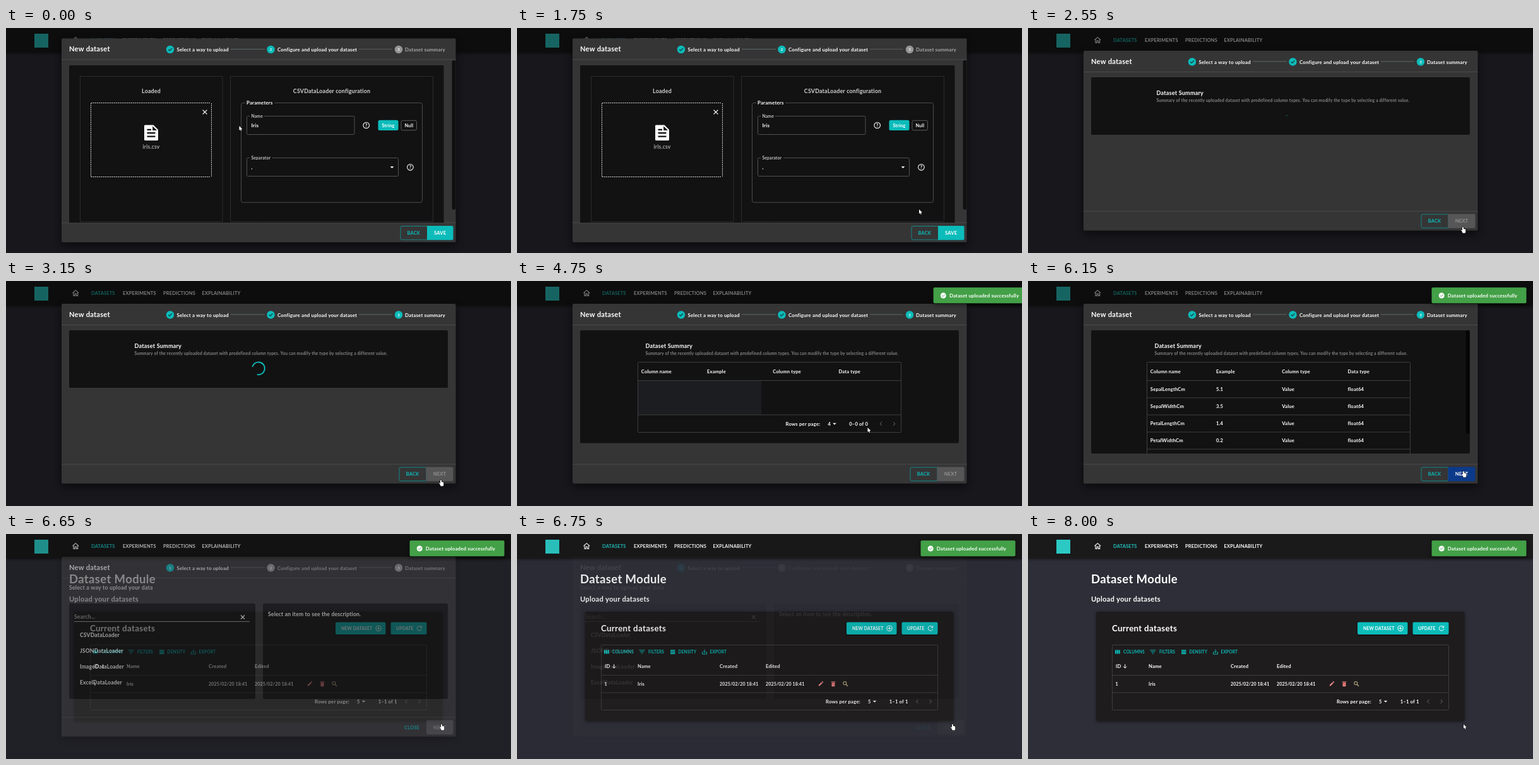
An HTML page with a canvas that plays this animation: 800 px wide and 356 px high, repeating every 8050 ms.

```html
<!DOCTYPE html>
<html lang="en">
<head>
<meta charset="utf-8">
<title>New dataset</title>
<style>
html, body { margin: 0; width: 100%; height: 100%; overflow: hidden; background: #17171c; }
canvas { display: block; width: 800px; height: 356px; }
</style>
</head>
<body>
<canvas id="stage"></canvas>
<script>
const W = 800, H = 356, LOOP = 8050;
const TEAL = '#0bbcba', WHITE = '#fff', GRAY = '#9b9b9c', LINE = '#3e3e40', PAPER = '#353536', INNER = '#121213';
const SAVED = 2550, UPLOADED = 4600, LOADED = 4950, HOVER = 5400, CLOSED = 6600;

const stage = document.getElementById('stage');
const layer = document.createElement('canvas');
const ratio = window.devicePixelRatio || 1;
for (const c of [stage, layer]) { c.width = W * ratio; c.height = H * ratio; }
const main = stage.getContext('2d'), modal = layer.getContext('2d');
main.scale(ratio, ratio);
modal.scale(ratio, ratio);
let g = main;

const clamp = v => Math.max(0, Math.min(1, v));
const smooth = v => { v = clamp(v); return v * v * (3 - 2 * v); };

function text(s, x, y, size, color = WHITE, align = 'left', weight = 700) {
  g.font = `${weight} ${size}px Lato, "Open Sans", sans-serif`;
  g.letterSpacing = size * 0.02 + 'px';
  g.textAlign = align;
  g.fillStyle = color;
  g.fillText(s, x, y + size * 0.36);
}
function box(x, y, w, h, fill, r = 0) {
  g.beginPath();
  g.roundRect(x, y, w, h, r);
  g.fillStyle = fill;
  g.fill();
}
function frame(x, y, w, h, color, r = 0) {
  g.beginPath();
  g.roundRect(x, y, w, h, r);
  stroke(color, 1);
}
function stroke(color, width) {
  g.strokeStyle = color;
  g.lineWidth = width;
  g.stroke();
}
function path(color, width, ...p) {
  g.beginPath();
  for (let i = 0; i < p.length; i += 2) g.lineTo(p[i], p[i + 1]);
  stroke(color, width);
}
function poly(color, ...p) {
  g.beginPath();
  for (let i = 0; i < p.length; i += 2) g.lineTo(p[i], p[i + 1]);
  g.fillStyle = color;
  g.fill();
}
function disc(x, y, r, color) {
  g.beginPath();
  g.arc(x, y, r, 0, 7);
  g.fillStyle = color;
  g.fill();
}
function ring(x, y, r, color, width = 1, from = 0, to = Math.PI * 2) {
  g.beginPath();
  g.arc(x, y, r, from, to);
  stroke(color, width);
}
function shadow(blur, dy, draw) {
  g.save();
  g.shadowColor = 'rgba(0,0,0,.5)';
  g.shadowBlur = blur * ratio;
  g.shadowOffsetY = dy * ratio;
  draw();
  g.restore();
}

const hline = (x1, x2, y, color = LINE) => path(color, 1, x1, y, x2, y);
const triangle = (x, y) => poly(WHITE, x - 2.8, y - 1.3, x + 2.8, y - 1.3, x, y + 1.6);
const tick = (x, y, k, color) => path(color, 1.1 * k, x - 2.6 * k, y, x - 0.8 * k, y + 1.9 * k, x + 2.8 * k, y - 1.9 * k);
function cross(x, y, r, color = WHITE) {
  path(color, 1.3, x - r, y - r, x + r, y + r);
  path(color, 1.3, x + r, y - r, x - r, y + r);
}
function help(x, y) {
  ring(x, y, 4.8, WHITE, 1.1);
  text('?', x, y, 8, WHITE, 'center');
}
function pager(x, y, rows, range, gaps) {
  text('Rows per page:', x, y, 7.8);
  text(rows, x + 67, y, 7.6);
  triangle(x + 77.5, y);
  text(range, x + 100.7, y, 7.7);
  for (const [cx, d] of [[x + gaps[0], -1], [x + gaps[1], 1]])
    path('#6c6c6e', 1, cx - d * 1.5, y - 3, cx + d * 1.5, y, cx - d * 1.5, y + 3);
}

function navBar() {
  shadow(4, 1, () => box(0, 0, W, 39, '#1a1a1b'));
  box(45, 9, 22, 22, '#2cc9c4');
  path(WHITE, 1.1, 105.5, 19, 110.3, 14.7, 115.1, 19);
  path(WHITE, 1.1, 107, 18.2, 107, 23.4, 109.2, 23.4, 109.2, 20, 111.4, 20, 111.4, 23.4, 113.6, 23.4, 113.6, 18.2);
  text('DATASETS', 135, 19.5, 7.5, '#21c2bd');
  text('EXPERIMENTS', 185, 19.5, 7.5);
  text('PREDICTIONS', 249, 19.5, 7.5);
  text('EXPLAINABILITY', 310.5, 19.5, 7.5);
}

function toolIcons() {
  for (let i = 0; i < 3; i++) box(138 + i * 2.8, 183.5, 2.2, 6, TEAL);
  hline(193.5, 202.5, 183.8, TEAL);
  hline(195, 201, 186.5, TEAL);
  hline(197, 199, 189.2, TEAL);
  for (let i = 0; i < 3; i++) box(243, 183.3 + i * 2.5, 7.5, 1.8, TEAL);
  path(TEAL, 1, 293.5, 186.5, 293.5, 190, 300.5, 190, 300.5, 186.5);
  path(TEAL, 1, 297, 182.5, 297, 187.5);
  path(TEAL, 1, 295, 185.7, 297, 187.7, 299, 185.7);
}

function page() {
  box(0, 0, W, H, '#2e2e38');
  navBar();
  text('Dataset Module', 100, 71, 18.5);
  text('Upload your datasets', 100, 102.5, 11.2);
  shadow(5, 1, () => box(108, 123, 583.5, 173, '#1e1c1d', 2));
  text('Current datasets', 133, 149.5, 13.4);

  shadow(3, 1, () => {
    box(522, 139.5, 79.5, 19.5, TEAL, 2);
    box(609.5, 139.5, 57, 19.5, TEAL, 2);
  });
  text('NEW DATASET', 531, 149.3, 6.9);
  ring(590, 149.3, 4.1, WHITE);
  path(WHITE, 1, 587.7, 149.3, 592.3, 149.3);
  path(WHITE, 1, 590, 147, 590, 151.6);
  text('UPDATE', 618, 149.3, 6.9);
  ring(655, 149.3, 3.6, WHITE, 1, 0.3, 5.5);
  path(WHITE, 1, 658.6, 145.3, 658.6, 148, 655.8, 148);

  frame(133.5, 175.5, 533, 103, LINE, 1);
  toolIcons();
  text('COLUMNS', 151, 186.5, 6.6, TEAL);
  text('FILTERS', 208, 186.5, 6.6, TEAL);
  text('DENSITY', 255.5, 186.5, 6.6, TEAL);
  text('EXPORT', 305.5, 186.5, 6.6, TEAL);

  text('ID', 139, 209.3, 7.7);
  path(WHITE, 1, 153.7, 206, 153.7, 212);
  path(WHITE, 1, 151, 209.5, 153.7, 212.2, 156.4, 209.5);
  text('Name', 191, 209.3, 7.7);
  text('Created', 321, 209.3, 7.7);
  text('Edited', 394, 209.3, 7.7);
  hline(134, 666, 223.5);
  text('1', 138.5, 237.3, 7.2);
  text('Iris', 191, 237.3, 7.7);
  text('2025/02/20 18:41', 321, 237.3, 7.05);
  text('2025/02/20 18:41', 394, 237.3, 7.05);
  path('#f08a8a', 2.2, 478.2, 240, 483, 235.2);
  path('#f08a8a', 2.2, 483.5, 234.7, 484.6, 233.6);
  box(498.5, 235.2, 5, 6, '#ef8080', 0.8);
  box(497.7, 233.4, 6.6, 1.2, '#ef8080');
  path('#8a4044', 0.8, 499.7, 236.5, 502.3, 239.3);
  ring(519.3, 236, 2.5, '#b9a983', 1.1);
  path('#b9a983', 1.3, 521.2, 238, 524, 240.8);
  hline(134, 666, 251);
  pager(489, 265, '5', '1–1 of 1', [145, 166]);
}

function stepper(y, active) {
  const steps = [[260, 'Select a way to upload', 270.5], [419.5, 'Configure and upload your dataset', 430], [622, 'Dataset summary', 632]];
  hline(356, 410, y - 0.5, '#5b6765');
  hline(559, 611.5, y - 0.5, active > 1 ? '#5b6765' : '#5d5d5e');
  steps.forEach(([x, label, tx], i) => {
    disc(x, y, 6.2, i <= active ? TEAL : '#969697');
    if (i < active) tick(x, y, 1.05, '#16393a');
    else text(String(i + 1), x, y, 6.2, WHITE, 'center');
    text(label, tx, y + 0.3, 7.9, i <= active ? WHITE : '#a9a9aa');
  });
}

function shell(top, bottom, footer, active) {
  shadow(14, 5, () => box(88, top, 624.5, bottom - top, PAPER, 2));
  text('New dataset', 100, top + 17, 11.1);
  stepper(top + 17.5, active);
  hline(88, 712.5, top + 33.5, '#4b4b4c');
  hline(88, 712.5, footer, '#4b4b4c');
}

function actions(x, y, mid, label, fill, color) {
  frame(x + 0.5, y + 0.5, mid - x, 21.5, '#138784', 2);
  text('BACK', (x + mid) / 2, y + 11.3, 7.4, TEAL, 'center');
  box(mid, y, 708.5 - mid, 22.5, fill, [0, 2, 2, 0]);
  text(label, (mid + 708.5) / 2, y + 11.3, 7.7, color, 'center');
}

function dropZone() {
  const c = '#cfcfcf', l = 134, t = 118, r = 326, b = 236;
  for (let x = l + 1; x < r - 2; x += 3) { box(x, t, 2, 1, c); box(x, b - 1, 2, 1, c); }
  for (let y = t + 1; y < b - 2; y += 3) { box(l, y, 1, 2, c); box(r - 1, y, 1, 2, c); }
  cross(315, 133, 3.4);
  poly(WHITE, 220, 153.5, 233.5, 153.5, 241, 161, 241, 177, 240, 178, 220, 178, 219, 177, 219, 154.5);
  poly(INNER, 232.2, 155.3, 232.2, 162, 239, 162);
  box(223.5, 165, 13, 2.2, INNER);
  box(223.5, 170.5, 13, 2.2, INNER);
  box(223.5, 159.7, 6.5, 2.2, INNER);
  text('iris.csv', 230, 188.3, 8.6, '#a3a3a4', 'center');
}

function field(x, y, w, label, value, gap) {
  frame(x + 0.5, y + 0.5, w, 29, '#515153', 2);
  box(x + 5, y - 1, gap, 3, INNER);
  text(label, x + 7.5, y + 0.3, 6.8, '#c4c4c5');
  text(value, x + 7.5, y + 15.3, 8.2);
}

function configure() {
  shell(16.5, 339, 308, 1);
  g.save();
  g.beginPath();
  g.rect(88, 51, 624.5, 257);
  g.clip();
  box(100, 59, 593.5, 260, INNER, 2);
  box(706.5, 51, 6, 236.5, '#101011', 3);
  frame(117.5, 76.5, 225.5, 230, '#2b2b2d');
  frame(355.5, 76.5, 321, 230, '#2b2b2d');
  text('Loaded', 230, 99.5, 8.9, '#d2d2d3', 'center');
  dropZone();
  text('CSVDataLoader configuration', 516, 99.5, 8.9, '#d2d2d3', 'center');
  frame(372.5, 118.5, 287, 157.5, '#4c4c4e', 3);
  box(379, 117, 46, 3, INNER);
  text('Parameters', 381, 118.3, 7.9);
  field(381, 139, 170.5, 'Name', 'Iris', 23);
  help(570.7, 154);
  box(589.5, 145.8, 32, 16.2, TEAL, 2.5);
  text('String', 605.5, 154, 7.3, WHITE, 'center');
  frame(626, 146.3, 24.5, 15.5, '#5b5b5d', 2.5);
  text('Null', 638.3, 154, 7.1, WHITE, 'center');
  field(381, 205, 240, 'Separator', ',', 36);
  triangle(611.5, 220.3);
  help(640.4, 220.3);
  g.restore();
  actions(624.5, 313, 667, 'SAVE', TEAL, WHITE);
}

function spinner(t) {
  const p = (t - SAVED) / 1400 % 1, total = 126.9;
  const e = smooth(p < 0.5 ? p * 2 : p * 2 - 1);
  const off = p < 0.5 ? 15 * e : 15 + 110 * e;
  const len = Math.min(p < 0.5 ? 1 + 99 * e : 100, total - off);
  const start = (p + off / total) * Math.PI * 2;
  ring(400, 138.3, 9.9, TEAL, 1.9, start, start + len / total * Math.PI * 2);
}

function summaryTable(full) {
  const l = full ? 188.5 : 191.5, bottom = full ? 296 : 239.5;
  const cols = [l + 5.3, l + 109.5, l + 213.7, l + 317.9];
  frame(l, 128.5, 417, bottom - 128.5, LINE, 1);
  ['Column name', 'Example', 'Column type', 'Data type'].forEach((s, i) => text(s, cols[i], 143.3, 7.6));
  hline(l, l + 417, 157.5);
  if (!full) {
    box(192, 158, 195, 53.5, '#1c1d21');
    hline(l, l + 417, 211.8);
    pager(425.5, 226, '4', '0–0 of 0', [151, 172]);
    return;
  }
  ['SepalLength', 'SepalWidth', 'PetalLength', 'PetalWidth'].forEach((name, i) => {
    const y = 171.3 + i * 27.1;
    [name + 'Cm', ['5.1', '3.5', '1.4', '0.2'][i], 'Value', 'float64'].forEach((s, j) => text(s, cols[j], y, 7.7));
    hline(l, l + 417, 184.8 + i * 27.1);
  });
}

function summary(t) {
  const full = t >= LOADED, shown = t >= UPLOADED;
  const x = full ? 200.4 : 203.5, bottom = full ? 273 : shown ? 256.5 : 169;
  shell(36, 320.5, 290, 2);
  box(100, 78, 600, bottom - 78, INNER, 2);
  g.save();
  g.beginPath();
  g.rect(100, 78, 600, bottom - 78);
  g.clip();
  text('Dataset Summary', x, 102.3, 9.1);
  text('Summary of the recently uploaded dataset with predefined column types. You can modify the type by selecting a different value.',
    x, 114.3, 6.75, '#858586');
  if (shown) summaryTable(full); else spinner(t);
  if (full) box(693.5, 78, 6, 164, '#060606', 3);
  g.restore();
  const fill = !full ? '#565657' : t < HOVER ? TEAL : '#0c3a8a';
  actions(622.5, 294.3, 665.5, 'NEXT', fill, full ? WHITE : '#919192');
}

function chooser() {
  shell(36, 320.5, 290, 0);
  text('Select a way to upload your data', 100, 84.5, 8.8, '#d0d0d0');
  box(100, 110, 295, 151, INNER, 2);
  box(407, 110, 293, 151, INNER, 2);
  text('Search...', 108, 130.5, 8.6, GRAY);
  cross(375, 131.5, 3);
  hline(108, 386, 138.5, GRAY);
  ['CSV', 'JSON', 'Image', 'Excel'].forEach((s, i) => text(s + 'DataLoader', 117, 160.3 + i * 25, 8.6));
  text('Select an item to see the description.', 415, 127.3, 8.6);
  text('CLOSE', 643, 306, 7.5, TEAL, 'center');
  box(666, 294.5, 42.5, 22.5, '#565657', 2);
  text('NEXT', 687, 306, 7.7, GRAY, 'center');
}

function dialog(t) {
  const alpha = t < CLOSED ? 1 : (1 - clamp((t - CLOSED) / 220)) ** 2;
  if (!alpha) return;
  g = modal;
  g.clearRect(0, 0, W, H);
  box(0, 0, W, H, 'rgba(0,0,0,.5)');
  if (t < SAVED) configure();
  else if (t < CLOSED) summary(t);
  else chooser();
  g = main;
  g.globalAlpha = alpha;
  g.drawImage(layer, 0, 0, W, H);
  g.globalAlpha = 1;
}

function toast(t) {
  const p = clamp((t - 4660) / 225);
  if (!p) return;
  const x = 639.5 + 160 * (1 - p) ** 4;
  shadow(6, 2, () => box(x, 10.3, 150, 25, '#43a047', 2));
  disc(x + 15.7, 23, 4.5, WHITE);
  tick(x + 15.7, 23, 0.85, '#43a047');
  text('Dataset uploaded successfully', x + 25.3, 23.2, 7.9);
}

const route = [
  [650, 369.5, 155], [1450, 637, 287], [1800, 637, 287], [2250, 689, 315], [3200, 689, 315],
  [3950, 555.5, 232], [4950, 555.5, 232], [5500, 690, 301], [LOOP, 690, 301]
];
function pointer(t) {
  let [, x, y] = route[0];
  for (let i = 1; i < route.length; i++) {
    const [t0, x0, y0] = route[i - 1], [t1, x1, y1] = route[i];
    if (t < t0) break;
    const k = smooth((t - t0) / (t1 - t0));
    x = x0 + (x1 - x0) * k;
    y = y0 + (y1 - y0) * k;
  }
  g.save();
  g.translate(x, y);
  if ((t > 2150 && t < 3220) || (t > HOVER && t < 6850)) {
    g.beginPath();
    g.roundRect(-1, 0, 2, 6, 1);
    g.roundRect(-1, 3, 5.2, 6.5, 1.5);
    stroke('#111', 1.2);
    g.fillStyle = WHITE;
    g.fill();
    poly(WHITE, -3.2, 4.8, -2, 4.4, 0, 6, 0.5, 9.3);
  } else {
    g.beginPath();
    for (const [px, py] of [[0, 0], [0, 7], [1.6, 5.6], [2.7, 8], [3.8, 7.5], [2.8, 5.2], [4.9, 5]]) g.lineTo(px, py);
    g.closePath();
    stroke('#111', 1.1);
    g.fillStyle = WHITE;
    g.fill();
  }
  g.restore();
}

const began = performance.now();
function tickFrame() {
  const t = (performance.now() - began) % LOOP;
  g = main;
  page();
  dialog(t);
  toast(t);
  pointer(t);
  requestAnimationFrame(tickFrame);
}
tickFrame();
</script>
</body>
</html>
```
